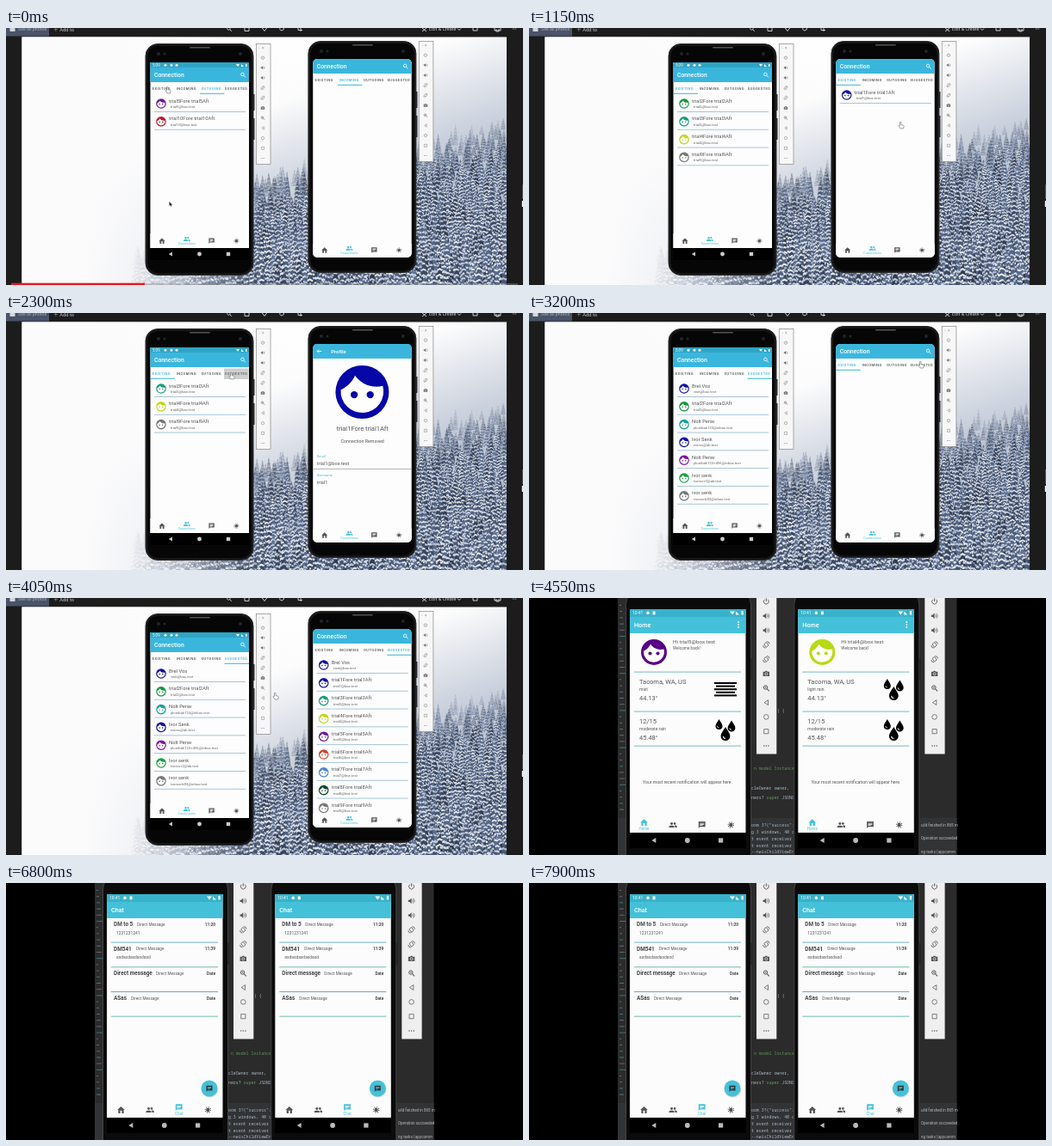
Recreate the animation shown at these times as an HTML page with a canvas. Size 600 px wide and 299 px high, loop 8000 ms.

```html
<!DOCTYPE html>
<html lang="en">
<head>
<meta charset="utf-8">
<title>Connections demo</title>
<style>
html,body{margin:0;width:100%;height:100%;overflow:hidden;background:#000}
canvas,svg{position:absolute;left:0;top:0;width:100%;height:100%;display:block}
text{font-family:Roboto,sans-serif;white-space:pre}
.mono{font-family:"Noto Sans Mono",monospace}
</style>
</head>
<body>
<canvas width="600" height="299"></canvas>
<svg viewBox="0 0 600 299" preserveAspectRatio="none"></svg>
<script>
const LOOP = 8000, CUT = 4200, CHAT = 6200;
const BLUE = '#3ab6dd', CYAN = '#44c1d9', INK = '#555';

// Drawing helpers
const rect = (x, y, w, h, fill, more = '') =>
  `<rect x="${x}" y="${y}" width="${w}" height="${h}" fill="${fill}" ${more}/>`;
const circle = (x, y, r, fill, more = '') =>
  `<circle cx="${x}" cy="${y}" r="${r}" fill="${fill}" ${more}/>`;
const text = (x, y, size, value, fill = INK, more = '') =>
  `<text x="${x}" y="${y}" font-size="${size}" fill="${fill}" ${more}>${value.replace(/&/g, '&amp;')}</text>`;
const path = (d, fill, more = '') => `<path d="${d}" fill="${fill}" ${more}/>`;
const line = (d, color, width = 1, more = '') =>
  path(d, 'none', `stroke="${color}" stroke-width="${width}" ${more}`);
const move = (x, y, body, scale = 1) =>
  `<g transform="translate(${x} ${y}) scale(${scale})">${body}</g>`;
const during = (from, to, body) => `<g data-from="${from}" data-to="${to}">${body}</g>`;
const MID = 'text-anchor="middle"', END = 'text-anchor="end"', BOLD = 'font-weight="500"', HEAVY = 'font-weight="700"';

// Icons centred on the origin, about ten units wide
const ICONS = {
  home: c => path('M-1.2 5V1h2.4v4H4V0h1.5L0-5-5.5 0H-4v5z', c),
  people: c => circle(-2, -2, 1.9, c) + circle(2.5, -2, 1.7, c) +
    path('M-6 4V2.5C-6 .3 2 .3 2 2.5V4zM3 4V2.5L2.2.8C4 .6 6 1.2 6 2.5V4z', c),
  chat: c => path('M-5-5H5V3H-3l-2 2zM-3-3v1h6v-1zM-3-1.4v1h6v-1zM-3 .2v1h4v-1z', c, 'fill-rule="evenodd"'),
  sun: c => circle(0, 0, 2.8, c) + circle(0, 0, 4, 'none', `stroke="${c}" stroke-width="1.5" stroke-dasharray="1.3 1.84"`),
  search: c => circle(-1, -1, 3, 'none', `stroke="${c}" stroke-width="1.3"`) + line('M1.2 1.2 4.7 4.7', c, 1.5),
  power: c => line('M-2.5-3A4 4 0 1 0 2.5-3M0-5V0', c, 1.2),
  volume: c => path('M-5-1.5h2l3-3v9l-3-3h-2z', c) + line('M1.5-2q2 2 0 4M2.5-4q4.5 4 0 8', c),
  rotate: c => line('M-3.5-1 0-4 3.5 1 0 4zM-5 1q0 4 4 4M5-1q0-4-4-4', c, 1.1),
  camera: c => path('M-5-3h3l1-1.5h2l1 1.5h3v7h-10z', c) + circle(0, .5, 2, 'none', 'stroke="#fff" stroke-width=".9"'),
  zoom: c => ICONS.search(c) + line('M-2.5-1h3M-1-2.5v3', c, .7),
  back: c => line('M3-4v8l-6-4z', c),
  round: c => circle(0, 0, 3.8, 'none', `stroke="${c}"`),
  square: c => line('M-3.5-3.5h7v7h-7z', c),
  dots: c => [-3.5, 0, 3.5].map(x => circle(x, 0, 1, c)).join('')
};
const icon = (name, x, y, size, color) => move(x, y, ICONS[name](color), size / 10);

const face = (x, y, r, color) => move(x, y,
  circle(0, 0, 10, color) +
  path('M-8-.9C-5.6-1.9-3.7-3.9-2.7-6.2-.9-3.7 2-2 5.4-2c.8 0 1.5-.1 2.3-.3A8 8 0 1 1-8-.9z', '#fff') +
  circle(-3, 1, 1.35, color) + circle(3, 1, 1.35, color), r / 10);

const TOOLS = ['power', 'volume', 'volume', 'rotate', 'rotate', 'camera', 'zoom', 'back', 'round', 'square', 'dots'];
const tools = (x, y, pitch, size, color) =>
  TOOLS.map((name, i) => icon(name, x, y + i * pitch, size, color)).join('');

const nav = (x, y, pitch, size, active, label) =>
  ['home', 'people', 'chat', 'sun'].map((name, i) => {
    const on = i === active;
    return icon(name, x + i * pitch, y - (on ? size * .35 : 0), size, on ? CYAN : INK);
  }).join('') + text(x + active * pitch, y + size * .72, size * .57, label, CYAN, MID);

const systemKeys = (x, y, pitch, s, color) =>
  path(`M${x + s * .8} ${y - s}v${2 * s}l${-1.7 * s} ${-s}z`, color) +
  circle(x + pitch, y, s, color) +
  rect(x + 2 * pitch - s * .9, y - s * .9, s * 1.8, s * 1.8, color);

// Contacts
const SHADES = { 1: '#1010a4', 2: '#12963c', 3: '#1b9c80', 4: '#c3d71c', 5: '#6d12a0',
  6: '#d0402c', 7: '#4c82d2', 8: '#0b4a2a', 9: '#777', 10: '#c31424' };
const tester = n => [`trial${n}Fore trial${n}Aft`, `trial${n}@box.test`, SHADES[n]];
const GUEST = ['Brel Vos', 'visit@box.test', '#1010a4'];
const LEFT_SUGGESTED = [GUEST, tester(2),
  ['Nolt Perav', 'plumbok123@inbox.test', '#18a098'],
  ['Ivor Senk', 'ivorss@ab.test', '#1010a4'],
  ['Nolt Perav', 'plumbok123+456@inbox.test', '#8010a0'],
  ['Ivor senk', 'ivorss+2@ab.test', '#18a040'],
  ['ivor senk', 'ivorsenk03@inbox.test', '#777']];
const RIGHT_SUGGESTED = [GUEST, ...[1, 3, 4, 5, 6, 7, 8, 9].map(tester)];

const row = ([name, mail, color], i) => {
  const y = i * 20.8;
  return face(180, 88 + y, 5.8, color) + text(189, 86.6 + y, 5.8, name) +
    text(191, 93 + y, 4.2, mail, '#666') + rect(172, 97 + y, 106, .9, '#9dbfd4');
};
const tabs = (active, people) =>
  ['EXISTING', 'INCOMING', 'OUTGOING', 'SUGGESTED'].map((name, i) =>
    text(180.4 + i * 28.9, 71.6, 4.1, name, i === active ? BLUE : INK, `${MID} ${BOLD} letter-spacing=".4"`)).join('') +
  rect(167.5 + active * 28.7, 75.8, 28.5, 1, BLUE) + people.map(row).join('');

// First scene
const shell = rect(286.5, 77, 2, 19, '#222') + rect(286.5, 105, 2, 25, '#222') +
  rect(162, 18.5, 125, 269, '#161616', 'rx="14" stroke="#2c2c2c" stroke-width="1"') +
  rect(164.5, 21, 120, 264, '#060606', 'rx="12"') + rect(213, 22, 24, 1.6, '#555', 'rx=".8"') +
  circle(177, 30, 2, '#20242c') + circle(184, 30, 1.6, '#20242c') + circle(272, 30, 2, '#20242c');
const sidebar = rect(290.3, 18.5, 16.7, 140, '#f7f7f8', 'stroke="#888" stroke-width=".7"') +
  text(293.5, 25, 4.6, '-  ×', '#888') + tools(298, 34.5, 11.7, 4.4, '#666');
const header = text(172, 57, 6.8, 'Connection', '#fff', BOLD) + icon('search', 275, 54.5, 6, '#fff');

const leftPhone = shell + sidebar +
  rect(167.5, 40, 114.5, 230, '#000') + rect(167.5, 40, 114.5, 216, '#fdfdfd') +
  rect(167.5, 40, 114.5, 23, BLUE) + rect(167.5, 40, 114.5, 6, '#2fa5c4') +
  text(170, 45, 4.5, '5:09', '#fff') + [185, 192, 198].map(x => circle(x, 43.2, 1.5, '#fff')).join('') +
  path('M267 42h4l-2 3zM273 45v-3l3 3zM278 42h1.5v3H278z', '#fff') + header +
  during(0, 150, tabs(2, [5, 10].map(tester))) +
  during(150, 1750, tabs(0, [2, 3, 4, 9].map(tester))) +
  during(1750, 2400, tabs(0, [3, 4, 9].map(tester))) +
  during(2200, 2400, rect(253, 64.5, 28.5, 12.5, '#777', 'opacity=".35"')) +
  during(2400, CUT, tabs(3, LEFT_SUGGESTED)) +
  rect(167.5, 239, 114.5, 17, '#fdfdfd') + nav(181, 247.7, 28.8, 6.4, 1, 'Connections') +
  systemKeys(191, 263, 33.5, 2.4, '#ccc');

const profile = rect(167.5, 46, 114.5, 17, BLUE) +
  line('M177.5 54.5h-5m2-2-2 2 2 2', '#fff', .9) + text(188.5, 57, 6, 'Profile', '#fff', BOLD) +
  face(224.7, 102, 31, '#0707a8') + text(225, 146.5, 7.5, tester(1)[0], INK, MID) +
  during(1750, 2800, text(225, 161, 5.3, 'Connection Removed', INK, MID)) +
  text(172, 177.5, 4, 'Email', BLUE) + text(172, 186.8, 5.6, tester(1)[1]) +
  rect(167.5, 191, 114.5, .7, '#999') +
  text(172, 199.5, 4, 'Username', BLUE) + text(172, 208.8, 5.6, 'trial1');

const rightPhone = move(188.9, -3, shell + sidebar) + move(188.7, -10,
  `<clipPath id="screen">${rect(167.5, 46, 114.5, 231, '#000', 'rx="5"')}</clipPath><g clip-path="url(#screen)">` +
  rect(167, 46, 116, 231, '#fdfdfd') + rect(167, 46, 116, 17, BLUE) +
  during(0, 1450, header) + during(2800, CUT, header) +
  during(0, 700, tabs(1, [])) + during(700, 1450, tabs(0, [tester(1)])) +
  during(1450, 2800, profile) + during(2800, 3250, tabs(0, [])) +
  during(3250, CUT, tabs(3, RIGHT_SUGGESTED)) +
  rect(167, 261, 116, 16, '#fdfdfd') + nav(181, 268.5, 28.8, 6.4, 1, 'Connections') + '</g>');

const viewer = rect(0, 0, 50, 9.5, '#4a5468') + rect(4.5, 0, 6, 4, '#d5d9e0') +
  text(14, 3.4, 5.3, 'See all photos', '#aab') + text(55, 3.6, 5.8, '＋ Add to', '#ccc') +
  icon('search', 259, 1, 6, '#ddd') + line('M277 0v3.5h5V0M319-1q-3 3 1 4q4-1 2-4M339 0v2.500h5M342 0v4', '#ddd', .9) +
  line('M296.5-1 300 3.500 303.5-1', '#ddd', .9) +
  line('M483 4l5-4M483 0l5 4M524 .5l2 2 2-2M542 0v3h5V0M567 0v3h7V0M569 1v3h3V1', '#ddd', .9) +
  text(491, 3.4, 5.5, 'Edit & Create', '#ccc') + icon('dots', 590, 1, 5, '#ddd') +
  rect(599, 182, 1, 17, '#555') + rect(598.8, 201, 1.2, 7, '#fff');

const hand = path('M-1.5-3.5q1-.8 1.5.3V-.5l2.6.8q.8.4.5 1.400L2.5 4H-1L-3 .8q.2-1 1.5-.2z',
  '#fff', 'stroke="#666" stroke-width=".6"');
const arrow = path('M189.5 202v5l1.200-1 .8 1.800.8-.4-.8-1.700h1.500z', '#222');

const firstScene = viewer + leftPhone + rightPhone +
  `<g id="controls">${rect(6, 297, 588, 2, '#888', 'opacity=".45"')}${rect(6, 296.7, 155, 2.3, '#e8161b')}${arrow}</g>` +
  `<g id="pointer">${hand}</g>`;

// Second scene
const code = (x, y, value, color = '#a9b7c6', size = 4.9) => text(x, y, size, value, color, 'class="mono"');
const bits = Array.from({ length: 34 }, (_, i) => {
  const y = 8 + i * 7.2, w = 2 + (i * 7) % 6;
  return rect(105, y, w, 1, ['#57707a', '#666', '#3d7480'][i % 3]);
}).join('');
const editor = rect(103, 0, 393.5, 299, '#2b2b2b') + rect(103, 256, 393.5, 43, '#313335') + bits +
  code(288, 133, ') {') + code(261, 200, 'n model Instance', '#5c9457') +
  code(258, 223, 'cleOwner owner,') + code(258, 234, 'ners? <tspan fill="#6a9a55">super</tspan> JSONO') +
  code(258, 266, 'oom 3?{"success":') + code(258, 274, 'g 3 windows, 40 c') +
  code(258, 282, 't event receiver') + code(258, 290, 't event receiver') + code(258, 297, '--nwisChildViewEnd') +
  text(455, 266, 4.5, 'uild finished in 865 m', '#bbb') + text(455, 281, 4.5, 'Operation succeeded', '#bbb') +
  text(455, 297, 4.5, 'ng tasks (appcomm', '#bbb');

const rule = (y, color = '#8cc7ce') => rect(122, y, 124, 1.2, color);
const drop = (x, y, s) => move(x, y,
  path('M0-6C2.500-2 4 0 4 2A4 4 0 0 1-4 2C-4 0-2.500-2 0-6z', '#000') + line('M-2 2Q-1.800 4 0 4', '#fff', .8), s);
const rain = y => drop(220.5, y - 5, 1) + drop(235, y - 3, 1.1) + drop(228, y + 6, 1.35);
const mist = Array.from({ length: 5 }, (_, i) =>
  rect(i % 2 ? 217 : 215, 98 + i * 3.6, i % 2 ? 22 : 26, 2, '#000')).join('');
const weather = (y, place, sky, temp) =>
  text(128, y, 7.5, place) + text(128, y + 8.2, 5, sky) + text(128, y + 18.5, 7.5, temp);

const home = (n, color, sky, skyIcon) =>
  text(122, 34, 7.2, 'Home', '#fff', BOLD) + [28, 31, 34].map(y => circle(243, y, .9, '#fff')).join('') +
  face(145, 63, 15, color) + text(167, 52.5, 6.2, `Hi trial${n}@box.test`) + text(167, 59.5, 4.7, 'Welcome back!') +
  rule(85.5) + weather(100, 'Tacoma, WA, US', sky, '44.13°') + skyIcon + rule(131.5) +
  weather(146, '12/15', 'moderate rain', '45.48°') + rain(152) + rule(171.5) +
  text(184, 215.5, 5.1, 'Your most recent notification will appear here.', INK, MID) +
  nav(133.5, 264, 33.6, 7.8, 0, 'Home');

const CHATS = [
  ['DM to 5', 152, '11:20', '1231231241', '#8bbfd8'],
  ['DM541', 151, '11:39', 'asdasdasdasdasd', '#86c9bd'],
  ['Direct message', 174, 'Date', '', '#86a9c9'],
  ['ASas', 145, 'Date', '', '#86c9bd']];
const chat = text(122, 34, 7.2, 'Chat', '#fff', BOLD) +
  CHATS.map(([name, x, when, message, color], i) => {
    const y = 50 + i * 28.7;
    return text(125, y, 6.4, name, '#444', HEAVY) + text(x, y - .5, 4.7, 'Direct Message') +
      text(243, y - .5, 4.8, when, '#444', `${END} ${HEAVY}`) + text(128, y + 9.5, 4.9, message) + rule(y + 18.5, color);
  }).join('') +
  circle(236.5, 240, 9.7, '#000', 'opacity=".13"') + circle(236, 239, 9.5, CYAN) + icon('chat', 236, 239.3, 7, '#333') +
  nav(133.5, 264, 33.6, 7.8, 2, 'Chat');

const bigPhone = (dx, homePage, switchAt) => move(dx, 0,
  rect(112.5, -7, 145, 320, '#0b0b0b', 'rx="14" stroke="#444" stroke-width="1"') +
  rect(257.5, 70, 1.5, 25, '#222') + rect(264, 0, 23.3, 181.5, '#efefef') + tools(275.3, 4, 16.8, 7.4, '#555') +
  rect(117, 13, 134.5, 278, '#000') + rect(117, 13, 134.5, 260, '#fcfcfc') +
  rect(117, 13, 134.5, 28, CYAN) + rect(117, 13, 134.5, 9, '#38b2ca') +
  text(120, 19.2, 4.9, '10:41', '#fff') + circle(138, 17.4, 1.8, '#fff') + rect(143.5, 15.5, 3, 3.8, '#fff') +
  path('M233 15.5h6l-3 4zM240 19.5v-4l4 4zM246.5 15h2.2v4.5h-2.2z', '#fff') +
  during(CUT, switchAt, homePage) + during(switchAt, LOOP, chat) +
  systemKeys(145, 282, 38.8, 2.9, '#bbb'));

const secondScene = rect(0, 0, 600, 299, '#000') + editor +
  bigPhone(0, home(5, '#580086', 'mist', mist), CHAT) +
  bigPhone(195.3, home(4, '#b8da12', 'light rain', rain(105)), CHAT + 100);

document.querySelector('svg').innerHTML = during(0, CUT, firstScene) + during(CUT, LOOP, secondScene);

// Snowy forest fading into fog towards the upper left
function paintForest() {
  const ctx = document.querySelector('canvas').getContext('2d');
  let seed = 11;
  const random = () => (seed = seed * 16807 % 2147483647) / 2147483647;
  const fade = (x0, y0, x1, y1, stops) => {
    const gradient = ctx.createLinearGradient(x0, y0, x1, y1);
    stops.forEach(([at, color]) => gradient.addColorStop(at, color));
    ctx.fillStyle = gradient;
    ctx.fillRect(18, 10, 563, 289);
  };
  const boughs = (x, y, height, width, color, thick) => {
    ctx.strokeStyle = color;
    ctx.lineWidth = thick;
    ctx.beginPath();
    for (let k = .12; k <= 1; k += .2) {
      const reach = width * k * (.6 + random() * .6), top = y - height * (1 - k);
      ctx.moveTo(x - reach, top + reach * .6);
      ctx.lineTo(x, top);
      ctx.lineTo(x + reach, top + reach * .6);
    }
    ctx.stroke();
  };

  ctx.fillStyle = '#1c1c1c';
  ctx.fillRect(0, 0, 600, 299);
  ctx.save();
  ctx.beginPath();
  ctx.rect(18.5, 10.5, 562.5, 289);
  ctx.clip();
  fade(0, 10, 0, 299, [[0, '#fefefe'], [.6, '#fafafb'], [1, '#f3f4f7']]);
  fade(370, 65, 420, 200, [[0, '#b9c2d200'], [1, '#b9c2d2']]);
  for (let y = 112; y < 335; y += 6) {
    for (let x = 150; x < 592; x += 7) {
      const px = x + random() * 7, edge = px > 280 ? 180 - (px - 280) * .22 : 262;
      const depth = y - edge - random() * 16;
      if (depth < 0) continue;
      const size = .55 + (y - 110) / 330, height = (17 + random() * 14) * size, width = 6.5 * size;
      ctx.globalAlpha = Math.min(1, .15 + depth / 55);
      ctx.fillStyle = `hsl(219 24% ${24 + random() * 26}%)`;
      ctx.beginPath();
      ctx.moveTo(px, y - height);
      ctx.lineTo(px + width * .8, y);
      ctx.lineTo(px - width * .8, y);
      ctx.fill();
      boughs(px, y, height, width, '#4b5872', 1.3 * size);
      boughs(px - .5, y - 1, height, width, `hsl(219 22% ${74 + random() * 20}%)`, 1.7 * size);
    }
  }
  ctx.globalAlpha = 1;
  fade(90, 0, 290, 0, [[0, '#fbfbfc'], [.35, '#fbfbfcd0'], [1, '#fbfbfc00']]);
  ctx.restore();
}
paintForest();

// Pointer stops: time, x, y
const STOPS = [[0, 188, 72], [200, 188, 72], [650, 368, 60], [1150, 432, 113], [1400, 400, 78], [1700, 413, 150],
  [1850, 413, 150], [2200, 262, 73], [2450, 262, 73], [2750, 364, 45], [2850, 364, 45], [3200, 455, 60],
  [3300, 455, 60], [3700, 313, 114], [CUT, 313, 114]];
function pointerAt(t) {
  const i = Math.max(1, STOPS.findIndex(stop => stop[0] > t));
  const [a, x, y] = STOPS[i - 1], [b, u, v] = STOPS[i];
  const p = Math.min(1, (t - a) / (b - a)), eased = p * p * (3 - 2 * p);
  return [x + (u - x) * eased, y + (v - y) * eased];
}

const timed = [...document.querySelectorAll('[data-from]')];
const pointer = document.getElementById('pointer'), controls = document.getElementById('controls');
function render(t) {
  for (const node of timed) {
    node.style.display = t >= +node.dataset.from && t < +node.dataset.to ? '' : 'none';
  }
  if (t < CUT) {
    pointer.setAttribute('transform', `translate(${pointerAt(t)})`);
    controls.style.opacity = Math.max(0, Math.min(1, (300 - t) / 200));
  }
}
const start = performance.now();
function tick() {
  render((performance.now() - start) % LOOP);
  requestAnimationFrame(tick);
}
tick();
</script>
</body>
</html>
```
